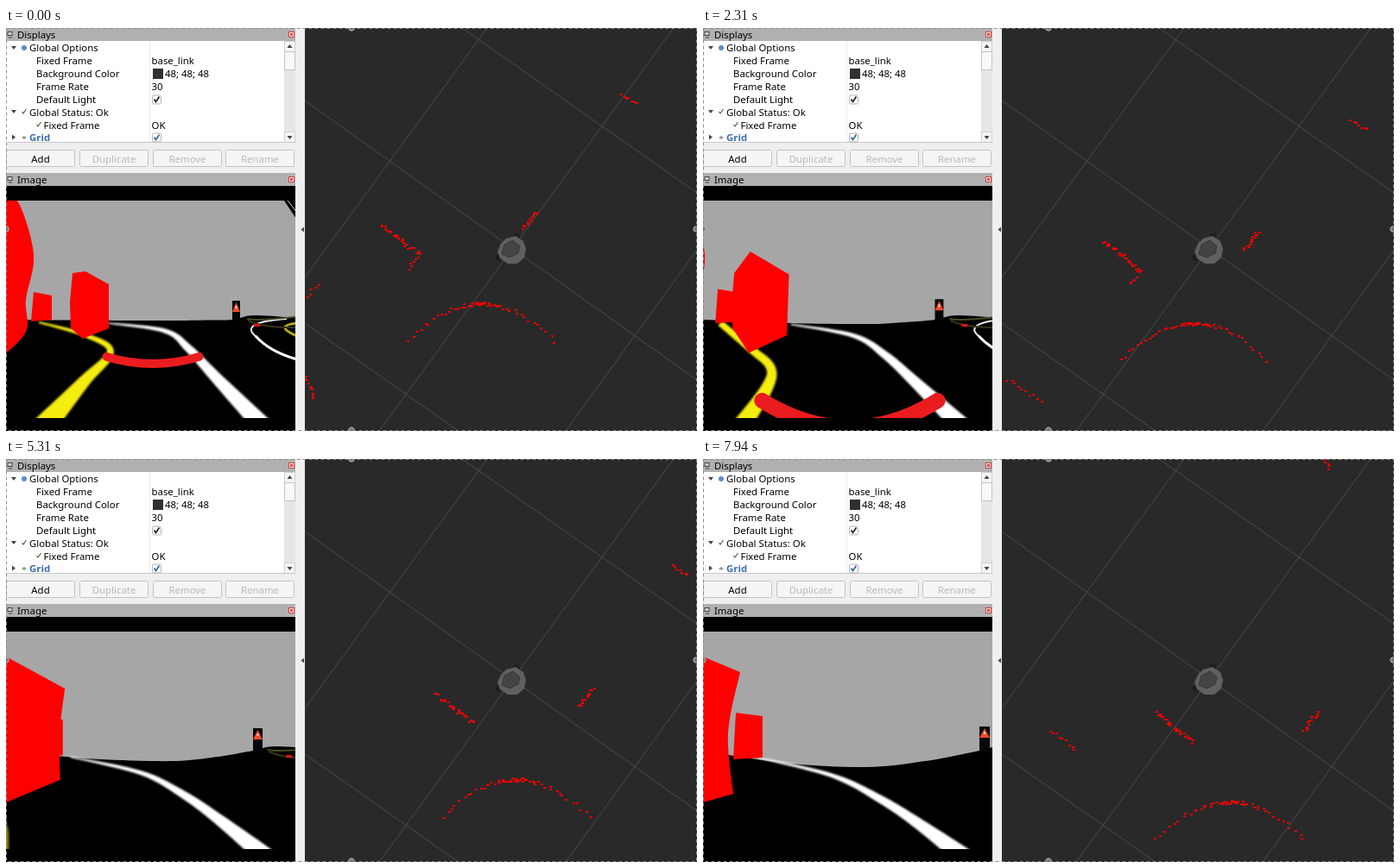
These frames come from a looping animation (800x467 px, 8000 ms). An HTML page with a canvas:

```html
<!DOCTYPE html>
<html lang="en">
<head>
<meta charset="utf-8">
<title>Robot view</title>
<style>
html, body { margin: 0; width: 100%; height: 100%; overflow: hidden; background: #efefef; }
svg, canvas { position: absolute; left: 0; top: 0; width: 800px; height: 467px; }
text { font: 11.4px "Noto Sans", "Open Sans", sans-serif; fill: #000; }
.off { fill: #b9b9b9; }
.mid { text-anchor: middle; }
</style>
</head>
<body>
<svg viewBox="0 0 800 467">
  <defs>
    <g id="bar">
      <rect width="335" height="15" fill="#b1b0b0"/>
      <rect x="2" y="4.5" width="5" height="4" fill="#ccd3d8" stroke="#444"/>
      <path d="M3 11H7" stroke="#444"/>
      <rect x="327.5" y="4.5" width="6" height="6" fill="#fff" stroke="#c44"/>
      <path d="M329 6l3 3m0-3l-3 3" stroke="#d22" stroke-width="1.3"/>
    </g>
    <g id="box">
      <rect x="-4.5" y="-4.5" width="10" height="10" rx="1.5" fill="#fff" stroke="#b5b5b5"/>
      <path d="M-2.5 0L-.5 3 3.5-3" fill="none" stroke="currentColor" stroke-width="1.7"/>
    </g>
    <path id="open" d="M-3-2H3L0 2Z" fill="#444"/>
    <path id="tick" d="M-2.5 0L-1 2 2.5-3" fill="none" stroke="#436b2c" stroke-width="1.2"/>
    <rect id="button" x=".5" y="141.5" width="79" height="19" rx="2" fill="#f5f5f5" stroke="#c3c3c3"/>
  </defs>

  <rect width="346" height="467" fill="#efefef"/>
  <use href="#bar"/>
  <text x="13" y="11.5">Displays</text>
  <rect y="15" width="335" height="117.5" fill="#fff"/>
  <path d="M166.5 15V132" stroke="#ececec"/>
  <rect x="322" y="15" width="13" height="117.5" fill="#e6e6e6"/>
  <rect x="322.5" y="15.5" width="12" height="12" fill="#f4f4f4" stroke="#cfcfcf"/>
  <rect x="322.5" y="27.5" width="12" height="21" fill="#f8f8f8" stroke="#c4c4c4"/>
  <rect x="322.5" y="120.5" width="12" height="12" fill="#f4f4f4" stroke="#cfcfcf"/>
  <path d="M325.5 23H331.5L328.5 19Z" fill="#444"/>
  <use href="#open" x="328.5" y="127"/>
  <path d="M0 132.5H335" stroke="#c6c6c6"/>

  <use href="#open" x="9" y="23"/>
  <circle cx="21" cy="23" r="3" fill="#5a8cc8"/>
  <text x="27" y="27">Global Options</text>
  <text x="35" y="42">Fixed Frame</text><text x="168.5" y="42">base_link</text>
  <text x="35" y="57">Background Color</text>
  <rect x="170" y="47" width="12" height="12" fill="#303030"/><text x="184" y="57">48; 48; 48</text>
  <text x="35" y="72">Frame Rate</text><text x="168.5" y="72">30</text>
  <text x="35" y="87">Default Light</text><use href="#box" x="174" y="82.5" color="#222"/>
  <use href="#open" x="9" y="97"/><use href="#tick" x="21" y="97"/>
  <text x="27" y="101.5">Global Status: Ok</text>
  <use href="#tick" x="38" y="112"/>
  <text x="43.5" y="116.5">Fixed Frame</text><text x="168.5" y="116.5">OK</text>
  <path d="M7 123.5V129.5L11 126.5Z" fill="#444"/>
  <path d="M18 127l3-2 3 2-3 2Z" fill="#999"/>
  <text x="27" y="131" style="font-weight:bold;fill:#3a6cb0">Grid</text>
  <use href="#box" x="174" y="126.5" color="#35669f"/>

  <use href="#button"/><use href="#button" x="85"/>
  <use href="#button" x="170"/><use href="#button" x="254"/>
  <text class="mid" x="40" y="155.5">Add</text>
  <text class="mid off" x="125" y="155.5">Duplicate</text>
  <text class="mid off" x="210" y="155.5">Remove</text>
  <text class="mid off" x="294" y="155.5">Rename</text>
  <use href="#bar" y="168"/>
  <text x="13" y="179.5">Image</text>
  <path d="M345 230.5V236.5L341.5 233.5Z" fill="#444"/>

  <rect x="346" width="454" height="467" fill="#2a2929"/>
  <path d="M557 0L346 289M773 0L432 467M800 257L648 467M346 84L800 408M528 0L800 191M346 342L524 467"
        stroke="#565656" stroke-width=".8"/>
  <g transform="translate(586 257)">
    <path d="M1-18l6-1 2 6-7 4ZM-20 8l7-5 3 8-7 2Z" fill="#1d1d1d"/>
    <path d="M-7-13L4-16 13-10 16-1 14 9 6 16-5 16-14 10-17 2-13-7Z" fill="#606060"/>
    <path d="M-9-6L1-11 9-4 7 4-3 9-12 5Z" fill="#444" stroke="#353535"/>
  </g>
</svg>
<canvas id="view" width="800" height="467"></canvas>

<script>
const ctx = document.getElementById('view').getContext('2d');
const LOOP = 8000, STEPS = 128;
const RED = '#f00';

// Road markings, near to far: first and later poses as x, y pairs
const WHITE = [
  [300,464, 243,405, 211,371, 184,351, 118,342],
  [306,464, 250,423, 205,394, 150,367, 64,346]
];
const YELLOW = [
  [44,462, 90,410, 121,375, 92,356, 38,341],
  [44,462, 70,419, 70,396, 46,373, 14,342],
  [-4,466, -4,435, -6,425, -9,410, -20,400]
];
const WALL = [[-9, 200], [13, 200], [32, 262], [23, 315], [23, 352], [-9, 385]];

const clamp = v => Math.min(1, Math.max(0, v));
const lerp = (a, b, u) => a + (b - a) * u;
const rand = (a, b) => {
  const v = Math.sin(a * 127.1 + b * 311.7) * 43758.5453;
  return v - Math.floor(v);
};
// Brief turn of the robot, which slides the whole camera scene
const yawAt = u => 14 * Math.exp(-(((u - .42) / .1) ** 2));

function tween(poses, u) {
  const pos = clamp(u) * (poses.length - 1), i = Math.min(Math.floor(pos), poses.length - 2);
  return poses[i].map((v, n) => lerp(v, poses[i + 1][n], pos - i));
}

function fillPoly(points, color) {
  ctx.beginPath();
  points.forEach(p => ctx.lineTo(...p));
  ctx.fillStyle = color;
  ctx.fill();
}

// Catmull-Rom samples through the given points
function smooth(p, n = 10) {
  const out = [];
  for (let i = 0; i < p.length - 1; i++) {
    const a = p[i - 1] || p[i], b = p[i], c = p[i + 1], d = p[i + 2] || c;
    for (let k = 0; k < n; k++) {
      const u = k / n;
      out.push(b.map((v, j) => v + u / 2 * (c[j] - a[j] +
        u * (2 * a[j] - 5 * v + 4 * c[j] - d[j] + u * (3 * (v - c[j]) + d[j] - a[j])))));
    }
  }
  return [...out, p[p.length - 1]];
}

// Road marking; far points follow the yaw most
function ribbon(flat, widths, yaw, color) {
  const line = smooth(widths.map((w, i) => {
    const y = flat[2 * i + 1];
    return [flat[2 * i] + yaw * (464 - y) / 120, y, w];
  }));
  const left = [], right = [];
  line.forEach(([x, y, w], i) => {
    const a = line[Math.max(i - 1, 0)], b = line[Math.min(i + 1, line.length - 1)];
    const dx = b[0] - a[0], dy = b[1] - a[1], k = w / 2 / (Math.hypot(dx, dy) || 1);
    left.push([x - dy * k, y + dx * k]);
    right.unshift([x + dy * k, y - dx * k]);
  });
  ctx.filter = 'blur(0.9px)';
  fillPoly([...left, ...right], color);
  ctx.filter = 'none';
}

function curve(color, width, x0, y0, cx, cy, x1, y1) {
  ctx.beginPath();
  ctx.moveTo(x0, y0);
  ctx.quadraticCurveTo(cx, cy, x1, y1);
  ctx.strokeStyle = color;
  ctx.lineWidth = width;
  ctx.stroke();
}

function drawHorizon(u, signX) {
  const dip = 339 + 18 * u ** 1.2;
  ctx.fillStyle = '#a6a6a6';
  ctx.fillRect(0, 200, 335, 170);
  fillPoly([...smooth([[0, 338], [95, lerp(338, dip, .75)], [190, dip],
    [lerp(190, signX, .55), lerp(dip, 338, .4)], [signX, 338], [signX + 25, 333], [signX + 75, 336]]),
    [420, 470], [0, 470]], '#000');
  const edge = 322 + 380 * u;
  fillPoly([[edge, 200], [edge + 20, 200], [edge + 20, 230]], '#000');
  curve('#ddd', 1, edge + 4, 200, edge + 9, 206, edge + 15, 214);
}

function drawSideRoad(u, yaw, signX) {
  ctx.save();
  ctx.translate(95 * u + yaw, 0);
  curve('#eee', 2, 325, 337, 268, 341, 290, 358);
  curve('#fff', 3, 289, 357, 305, 375, 337, 384);
  curve('#b5a91c', 3, 337, 342, 309, 345, 337, 357);
  ctx.restore();
  curve('#4d4a26', 2, signX + 17, 337, signX + 32, 340, signX + 80, 334);
  curve('#343219', 2, signX + 18, 339, signX + 38, 348, signX + 75, 347);
  ctx.fillStyle = '#d81414';
  ctx.fillRect(signX + 25 + 20 * u, 343, 7, 3);
}

function drawSign(u, x) {
  const w = 9 + 3 * u, top = 316 - 6 * u, mid = x + w / 2;
  ctx.fillStyle = '#080808';
  ctx.fillRect(x, top, w, 339 - top);
  fillPoly([[mid, top + 2], [x + w, top + 13], [x, top + 13]], '#ef4a2c');
  ctx.fillStyle = '#f2d0b8';
  ctx.fillRect(mid - 1, top + 6, 2, 3);
}

// Target arc ahead of the robot, closing in until it leaves the picture
function drawGoal(u) {
  const y = 381 + 80 * u + 325 * u * u, half = 53.5 + 165 * u, sag = 8 + 80 * u;
  ctx.lineCap = 'round';
  curve('#ea1c1f', 10 + 28 * u, 170 - half, y, 170, y + 2 * sag, 170 + half, y);
}

function drawObstacles(u, near, yaw) {
  // the second box comes out from behind the block
  const hidden = u > .58, x = hidden ? 36 : 30 - 60 * u, w = 23 + 10 * u;
  const top = 306 - 12 * u, bottom = 339 + 8 * u;
  const shift = ([px, py]) => [px + yaw, py];
  fillPoly([[x + 2, top], [x + w, top + 4], [x + w, bottom - 1], [x - 1, bottom + 1]].map(shift), RED);
  fillPoly(smooth(WALL).map(([px, py]) => [px + yaw - 112 * u, py]), RED);

  const right = 119 - 76 * u, left = lerp(75, -25, near);
  const rightTop = 297 - 50 * u ** 1.2, rightBottom = 348 + 40 * u ** 1.3;
  const side = smooth([[right, rightTop], [right - 14 * u * u, (rightTop + rightBottom) / 2],
    [right - 8 * u, rightBottom]]);
  fillPoly([[lerp(92, 0, near), lerp(282, 229, near)], ...side,
    [lerp(89, 0, near), lerp(360, 398, near)], [left, 348], [left - 1, 318], [left + 2, 284]].map(shift), RED);
}

function drawCamera(u) {
  const yaw = yawAt(u), near = clamp(u / .67), signX = 262 + 58 * u ** 2.2 + yaw;
  ctx.fillStyle = '#000';
  ctx.fillRect(0, 183, 335, 284);
  ctx.save();
  ctx.beginPath();
  ctx.rect(0, 200, 335, 252);
  ctx.clip();
  drawHorizon(u, signX);
  drawSideRoad(u, yaw, signX);
  drawSign(u, signX);
  const drift = 100 * Math.max(0, u - .67);
  ribbon(tween(YELLOW, near), [27, 14, 8, 5, 2].map(w => lerp(w, 14, near)), yaw - drift,
    near < .9 ? '#f5ec10' : '#8f8500');
  ribbon(tween(WHITE, 1.2 * u), [22, 13, 9, 5, 1.5], yaw, '#fff');
  drawGoal(u);
  drawObstacles(u, near, yaw);
  ctx.restore();
}

const segment = (x, y, dx, dy) => t => [x + dx * t, y + dy * t];

// Scattered dots along a path; bunch pulls them toward its middle
function scan(path, count, noise, step, seed, bunch = 0) {
  ctx.fillStyle = '#f40000';
  for (let i = 0; i < count; i++) {
    const t = i / (count - 1);
    const [x, y] = path(t + bunch * Math.sin(2 * Math.PI * t) / (2 * Math.PI));
    const jx = (rand(i + seed, step) - .5) * noise, jy = (rand(step, i + seed + 50) - .5) * noise;
    ctx.fillRect(Math.round(x + jx) - 1, Math.round(y + jy) - 1, 3, 2);
  }
}

function drawLaser(u, step) {
  ctx.save();
  ctx.beginPath();
  ctx.rect(346, 0, 454, 467);
  ctx.clip();

  const cornerX = 478 + 102 * u - 12 * u * u, cornerY = 262 + 66 * u;
  scan(segment(cornerX, cornerY, -43, -33), 28, 5, step, 1);
  if (u < .6) scan(segment(cornerX, cornerY, -13, 17), 7, 4, step, 60);

  scan(segment(614 + 98 * u, 213 + 80 * u, -16, 20), 15, 5, step, 100);

  const arc = t => {
    const d = 85 * (2 * t - 1);
    return [550 + 60 * u + d, 320 + 78 * u + .006 * d * d];
  };
  scan(arc, 54, 4.5, step, 200, .6);

  const far = clamp(u / .45);
  if (u < .78) scan(segment(712 + 59 * far, 77 + 47 * far, 18, 11), 7, 3, step, 300);
  if (u < .11) scan(segment(361, 297, -13, 15), 5, 3, step, 400);
  if (u < .58) scan(segment(347 + 60 * u * u, 404 + 40 * u * u, 8 + 32 * clamp(5 * u), 25), 10, 4, step, 500);
  if (u > .78) scan(segment(402, 314, 28, 22), 9, 4, step, 600);
  if (u > .94) scan(segment(720, 2, 5, 9), 5, 3, step, 700);
  ctx.restore();
}

function drawFrame() {
  ctx.setLineDash([4, 3]);
  ctx.strokeStyle = '#8e8e8e';
  ctx.lineWidth = 1;
  ctx.strokeRect(.5, .5, 799, 466);
  ctx.setLineDash([]);
  for (const [x, y] of [[400, 0], [400, 466], [0, 233], [799, 233]]) {
    ctx.beginPath();
    ctx.arc(x, y, 3.2, 0, 7);
    ctx.fillStyle = '#777';
    ctx.fill();
    ctx.strokeStyle = '#b8b8b8';
    ctx.stroke();
  }
}

let start, shown = -1;
function tick(now) {
  start ??= now;
  const step = Math.min(STEPS - 1, Math.floor(((now - start) % LOOP + 3) * STEPS / LOOP));
  if (step !== shown) {
    shown = step;
    const u = step / (STEPS - 1);
    ctx.clearRect(0, 0, 800, 467);
    drawCamera(u);
    drawLaser(u, step);
    drawFrame();
  }
  requestAnimationFrame(tick);
}
requestAnimationFrame(tick);
</script>
</body>
</html>
```
